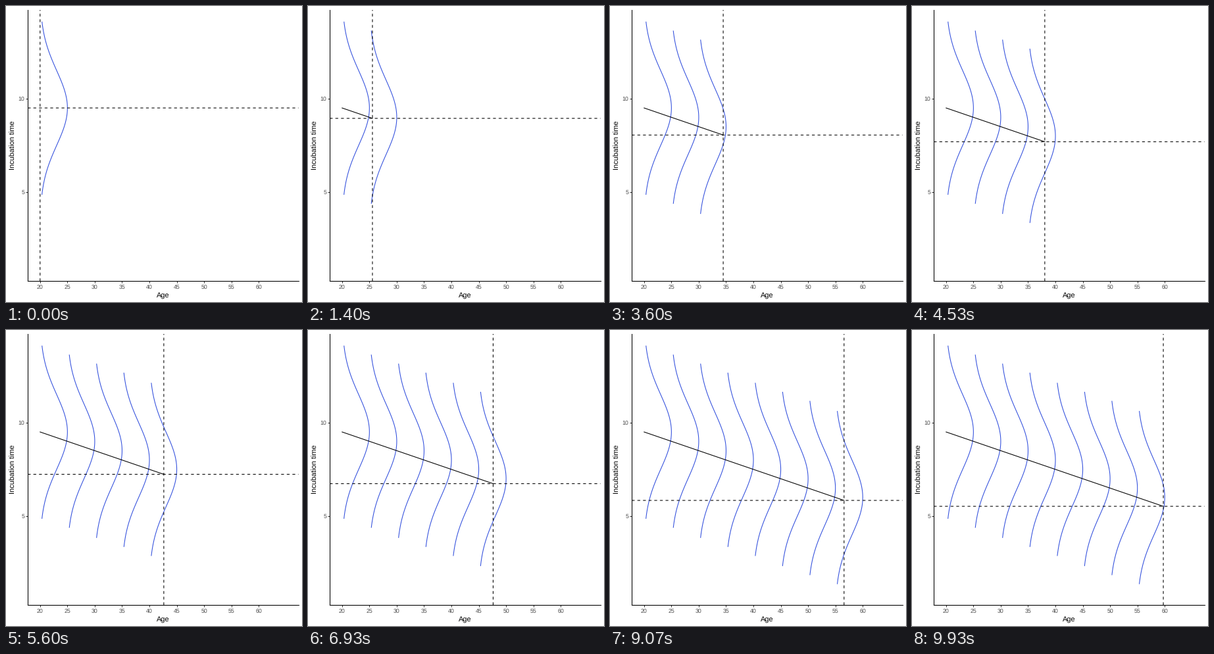
A matplotlib script for the animation above (10000 ms loop, 450 px wide and 450 px high).

```python
import matplotlib.pyplot as plt
import numpy as np
from matplotlib.animation import FuncAnimation

SIZE = 450
DPI = 72
FRAMES = 150
LOOP_MS = 10000
LEFT, RIGHT, TOP, BOTTOM = 33.1, 444.5, 5.5, 418.3   # panel edges in px
LINE = 1.07
BLUE = "#3350dd"
DASH = (0, (4, 4))

plt.rcParams.update({
    "font.family": "Liberation Sans",
    "text.hinting": "none",
    "lines.scale_dashes": True,
    "path.simplify": False,
})

AGES = np.arange(20, 61, 5)
KEYS = np.round((FRAMES - 1) * np.arange(len(AGES)) / (len(AGES) - 1))
SD = 2
REACH = 2.3263 * SD          # central 98 % of the distribution
GRID = np.linspace(0, 15, 250)


def mean_time(age):
    return 9.5 - 0.1 * (age - 20)


def bell(age):
    """Sideways normal curve standing on the given age."""
    mu = mean_time(age)
    y = GRID[np.abs(GRID - mu) <= REACH]
    return age + 5 * np.exp(-((y - mu) / SD) ** 2 / 2), y


bells = [bell(age) for age in AGES]
y_min, y_max = bells[-1][1][0], bells[0][1][-1]
y_pad = 0.05 * (y_max - y_min)

fig = plt.figure(figsize=(SIZE / DPI, SIZE / DPI), dpi=DPI, facecolor="white")
ax = fig.add_axes([LEFT / SIZE, 1 - BOTTOM / SIZE,
                   (RIGHT - LEFT) / SIZE, (BOTTOM - TOP) / SIZE])
ax.set_xlim(17.75, 67.25)
ax.set_ylim(y_min - y_pad, y_max + y_pad)
ax.spines[["top", "right"]].set_visible(False)
ax.spines[["left", "bottom"]].set_linewidth(LINE)
ax.set_xticks(AGES)
ax.set_yticks([5, 10])
ax.tick_params(length=2.75, width=LINE, color="#333333",
               labelbottom=False, labelleft=False)


def label(x, y, text, size, color, **kw):
    """Text on a baseline given in px from the top left."""
    fig.text(x / SIZE, 1 - y / SIZE, text, fontsize=size, color=color,
             va="baseline", rotation_mode="anchor", **kw)


def to_px(x, y):
    px, py = ax.transData.transform((x, y))
    return px, SIZE - py


for age in AGES:
    label(to_px(age, 5)[0], 429.8, str(age), 8.8, "#4d4d4d", ha="center")
for value in (5, 10):
    label(28.2, to_px(20, value)[1] + 3.2, str(value), 8.8, "#4d4d4d", ha="right")
label((LEFT + RIGHT) / 2, 442.7, "Age", 11, "black", ha="center")
label(13.4, (TOP + BOTTOM) / 2, "Incubation time", 11, "black",
      ha="center", rotation=90)

curves = [ax.plot(x, y, color=BLUE, lw=LINE, zorder=2)[0] for x, y in bells]
trend, = ax.plot([], [], color="black", lw=LINE, zorder=3)
vline = ax.axvline(20, color="black", lw=LINE, ls=DASH, zorder=4, snap=False)
hline = ax.axhline(9.5, color="black", lw=LINE, ls=DASH, zorder=4, snap=False)
for line in (vline, hline):
    line.set_dash_capstyle("butt")


def draw(i):
    age = np.interp(i, KEYS, AGES)
    y = mean_time(age)
    for curve, key in zip(curves, KEYS):
        curve.set_visible(i >= key)
    trend.set_data([20, age], [mean_time(20), y])
    vline.set_xdata([age, age])
    hline.set_ydata([y, y])
    return [*curves, trend, vline, hline]


anim = FuncAnimation(fig, draw, frames=FRAMES, interval=LOOP_MS / FRAMES,
                     repeat=True, repeat_delay=0)
plt.show()
```
